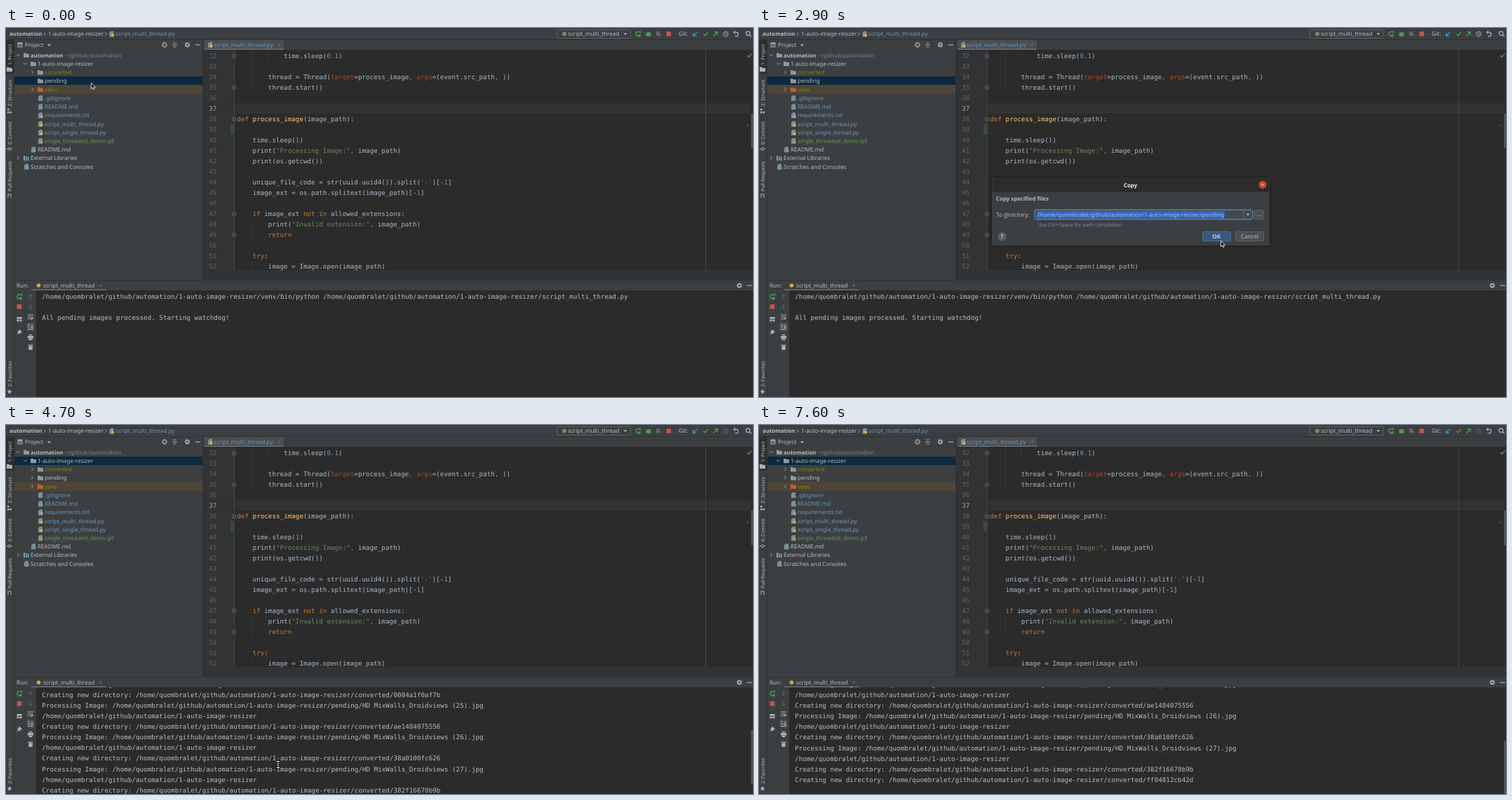
Animation, 1065 px wide and 526 px high, one loop 8.2 s. Source, as an HTML page with a canvas:

```html
<!DOCTYPE html>
<html lang="en">
<head>
<meta charset="utf-8">
<title>Image resizer demo</title>
<style>
  html, body { margin: 0; width: 100%; height: 100%; overflow: hidden; background: #2b2b2b; }
  canvas { display: block; width: 1065px; height: 526px; }
</style>
</head>
<body>
<canvas id="stage" width="1065" height="526"></canvas>
<script>
const ctx = document.getElementById('stage').getContext('2d');
const LOOP = 8200, STEP = 100;
const UI = '"Noto Sans", "Open Sans", sans-serif';
const MONO = '"DejaVu Sans Mono", "Noto Sans Mono", monospace';
const MONO_SIZE = 9.25, CHAR = MONO_SIZE * 0.602, LINE = 15.03, ROW = 12.22;
const C = {
  panel: '#3c3f41', editor: '#2b2b2b', gutter: '#313335', edge: '#323232', text: '#bbbbbb',
  icon: '#afb1b3', dim: '#64676a', blue: '#6897bb', olive: '#848504', green: '#629755',
  go: '#499c54', red: '#c75450', select: '#0d293e', folder: '#8e9aa2', py: '#c9b04a',
  underline: '#66707a'
};
const ROOT = '/home/quombralet/github/automation/1-auto-image-resizer';

function rect(x, y, w, h, color) { ctx.fillStyle = color; ctx.fillRect(x, y, w, h); }

function box(x, y, w, h, fill, stroke, r = 2) {
  ctx.beginPath();
  ctx.roundRect(x + .5, y + .5, w - 1, h - 1, r);
  if (fill) { ctx.fillStyle = fill; ctx.fill(); }
  if (stroke) { ctx.strokeStyle = stroke; ctx.lineWidth = 1; ctx.stroke(); }
}

function dot(x, y, r, color) {
  ctx.fillStyle = color;
  ctx.beginPath(); ctx.arc(x, y, r, 0, 7); ctx.fill();
}

function ring(x, y, r, color, from = 0, to = Math.PI * 2, w = 1) {
  ctx.strokeStyle = color; ctx.lineWidth = w;
  ctx.beginPath(); ctx.arc(x, y, r, from, to); ctx.stroke();
}

// Points are "x,y x,y ..." relative to a centre; "M" starts a new stroke.
function trace(x, y, points) {
  ctx.beginPath();
  for (const part of points.split('M')) {
    part.trim().split(' ').forEach((p, i) => {
      const [dx, dy] = p.split(',').map(Number);
      i ? ctx.lineTo(x + dx, y + dy) : ctx.moveTo(x + dx, y + dy);
    });
  }
}
function lines(x, y, points, color = C.icon, w = 1) {
  trace(x, y, points); ctx.strokeStyle = color; ctx.lineWidth = w; ctx.stroke();
}
function poly(x, y, points, color = C.icon) {
  trace(x, y, points); ctx.fillStyle = color; ctx.fill();
}

function label(s, x, y, color = C.text, { size = 8.15, bold = false, align = 'left' } = {}) {
  ctx.font = `${bold ? 'bold ' : ''}${size}px ${UI}`;
  ctx.fillStyle = color; ctx.textAlign = align;
  ctx.fillText(s, x, y + 2.9);
}
function mono(s, x, y, color = C.text, align = 'left') {
  ctx.font = `${MONO_SIZE}px ${MONO}`;
  ctx.fillStyle = color; ctx.textAlign = align;
  ctx.fillText(s, x, y + 3.3);
}

const down = (x, y, color) => poly(x, y, '-2.5,-1.3 2.5,-1.3 0,1.7', color);
const close = (x, y, color = '#777a7c') => lines(x, y, '-1.7,-1.7 1.7,1.7 M 1.7,-1.7 -1.7,1.7', color, .8);
const check = (x, y, color) => lines(x, y, '-3,0 -1,2.4 3.2,-2.6', color, 1.4);
const minus = (x, y) => rect(x - 3.5, y - .5, 7, 1.2, C.icon);
const folder = (x, y, color = C.folder) => poly(x, y, '-4,-3.2 -.8,-3.2 .4,-2 4,-2 4,3.2 -4,3.2', color);
function chevron(x, y, open) {
  lines(x, y, open ? '-2.3,-1.2 0,1.3 2.3,-1.2' : '-1.2,-2.3 1.3,0 -1.2,2.3', '#a0a3a5');
}
function file(x, y, badge) {
  poly(x, y, '-1,-4 3,-4 3,4 -3,4 -3,-2', '#828d94');
  if (badge) dot(x + 1.6, y + 1.7, 2.2, badge);
}
function gear(x, y) {
  ring(x, y, 2.2, C.icon, 0, 7, 1.6);
  for (let i = 0; i < 8; i++) {
    const a = i * Math.PI / 4;
    dot(x + 3.2 * Math.cos(a), y + 3.2 * Math.sin(a), .7, C.icon);
  }
}
function rerun(x, y) {
  ring(x, y, 3, C.go, .2, 5, 1.3);
  poly(x, y, '.5,-4 4,-4 4,-.6', C.go);
  rect(x, y + 1, 3.5, 3, C.go);
}
function sideLabel(s, y, color = C.text) {
  ctx.save();
  ctx.translate(5, y); ctx.rotate(-Math.PI / 2);
  label(s, 0, 0, color, { size: 6.9 });
  ctx.restore();
}

function drawTopBar(busy) {
  label('automation', 5, 8.5, C.text, { bold: true, size: 7.85 });
  chevron(55, 8.5);
  label('1-auto-image-resizer', 60, 8.5);
  chevron(142.5, 8.5);
  file(150.5, 8.5, C.py);
  label('script_multi_thread.py', 156, 8.5, C.blue);
  box(785, 2, 106, 13, null, '#5e6163');
  dot(796, 8.5, 3, '#6f8f6a');
  label('script_multi_thread', 801, 8.5);
  down(883, 8.5, C.icon);
  rerun(901, 8.5);
  dot(916, 9, 3.2, C.go);
  lines(916, 9, '-4,-2 4,2 M -4,2 4,-2 M -4,0 4,0', C.go, .8);
  rect(927, 5, 5, 6, C.dim);
  poly(932, 9.5, '-1.5,-3 3,0 -1.5,3', '#5a5d5f');
  rect(941.5, 5.2, 6.5, 6.5, C.red);
  label('Git:', 959, 8.5);
  lines(982.5, 8.5, '3,-3 -2.5,2.5 M -2.8,-1.5 -2.8,2.8 1.5,2.8', '#3592c4', 1.4);
  check(997.5, 8.5, C.go);
  lines(1011.5, 8.5, '-3,3 2.5,-2.5 M -1.5,-2.8 2.8,-2.8 2.8,1.5', C.go, 1.4);
  const clock = busy ? C.dim : C.icon;
  ring(1026, 8.5, 3.4, clock);
  lines(1026, 8.5, '0,-2 0,.3 1.8,.3', clock);
  ring(1041, 9, 2.8, C.icon, -1.6, 2.2, 1.2);
  lines(1041, 9, '0,-2.8 -3.3,-2.8 M -1.2,-5 -3.4,-2.8 -1.2,-.6', C.icon, 1.1);
  ring(1058, 7.7, 2.8, C.icon, 0, 7, 1.2);
  lines(1058, 7.7, '2,2 4.6,4.6', C.icon, 1.3);
}

function drawSideBar() {
  rect(0, 17, 11, 48, '#2d2f30');
  sideLabel('1: Project', 53);
  folder(5, 59, C.icon);
  sideLabel('Z: Structure', 111.5);
  for (const [x, y] of [[2, 115], [2, 119], [5.5, 119]]) rect(x, y, 2.5, 2.5, C.icon);
  sideLabel('0: Commit', 166.5);
  ring(5, 172.5, 1.8, C.icon);
  lines(5, 172.5, '-4,0 -2,0 M 2,0 4,0');
  sideLabel('Pull Requests', 233);
  lines(5, 239, '-2,-3 -2,3 M 2,3 2,-2 -1,-2');
  sideLabel('2: Favorites', 511.5);
  poly(5, 518, '0,-3.6 1,-1 3.6,-1 1.6,.8 2.3,3.4 0,1.9 -2.3,3.4 -1.6,.8 -3.6,-1 -1,-1');
}

// [indent, text, colour, icon, chevron]
const TREE = [
  [0, 'automation', C.text, 'dir', 'open'],
  [1, '1-auto-image-resizer', C.text, 'dir', 'open'],
  [2, 'converted', C.olive, 'dir', 'shut'],
  [2, 'pending', C.text, 'dir'],
  [2, 'venv', C.olive, 'venv', 'shut'],
  [2, '.gitignore', C.blue, '#7d8a94'],
  [2, 'README.md', C.blue, '#5b9cc0'],
  [2, 'requirements.txt', C.blue, '#9aa7b0'],
  [2, 'script_multi_thread.py', C.blue, C.py],
  [2, 'script_single_thread.py', C.blue, C.py],
  [2, 'single_threaded_demo.gif', C.green, '#7fa86a'],
  [1, 'README.md', C.text, '#5b9cc0'],
  [0, 'External Libraries', C.text, 'lib', 'shut'],
  [0, 'Scratches and Consoles', C.text, '#5b9cc0']
];

function drawProject(copied) {
  rect(16.5, 20.5, 7, 7, '#9aa7b0');
  rect(17.5, 23, 5, 3.5, '#45687f');
  label('Project', 27, 24);
  down(61.5, 24.5, C.icon);
  ring(226, 24, 3.3, C.icon);
  lines(226, 24, '-3.5,0 -1,0 M 1,0 3.5,0 M 0,-3.5 0,-1 M 0,1 0,3.5');
  lines(240.5, 24, '-3.5,0 3.5,0 M -2,-4 0,-2 2,-4 M -2,4 0,2 2,4');
  gear(258.5, 24);
  minus(273.5, 24);

  const top = 38.9;
  const band = (row, color) => {
    const y = Math.round(top - .2 + (row - .5) * ROW);
    rect(11, y, 269, Math.round(top - .2 + (row + .5) * ROW) - y, color);
  };
  band(4, '#4d4538');
  band(copied ? 1 : 3, C.select);
  TREE.forEach(([depth, name, color, icon, arrow], i) => {
    const x = 29 + depth * 10, y = top + i * ROW;
    const mark = name === 'pending' && copied ? 'shut' : arrow;
    if (mark) chevron(x - 11.5, y - .3, mark === 'open');
    if (icon === 'dir') folder(x, y);
    else if (icon === 'venv') folder(x, y, '#c2602d');
    else if (icon === 'lib') [0, 1, 2].forEach(k => rect(x - 4 + k * 2.8, y - 3.5 + k * .7, 2, 7 - k * .7, k ? '#5b9cc0' : '#8e9aa2'));
    else file(x, y, icon);
    label(name, x + 6, y, color, i ? {} : { bold: true, size: 7.85 });
  });
  label('~/github/automation', 84, top, '#808385');
}

const CODE = `            time.sleep(0.1)

        thread = Thread(target=process_image, args=(event.src_path, ))
        thread.start()


def process_image(image_path):

    time.sleep(1)
    print("Processing Image:", image_path)
    print(os.getcwd())

    unique_file_code = str(uuid.uuid4()).split('-')[-1]
    image_ext = os.path.splitext(image_path)[-1]

    if image_ext not in allowed_extensions:
        print("Invalid extension:", image_path)
        return

    try:
        image = Image.open(image_path)`.split('\n');

const TOKENS = [
  [/^(".*?"|'.*?')/, '#6a8759'],
  [/^(def|if|not|in|return|try)\b/, '#cc7832'],
  [/^(target|args)(?==)/, '#aa4926'],
  [/^process_image(?=\(image_path\):)/, '#ffc66d'],
  [/^,/, '#cc7832'],
  [/^\d+(\.\d+)?/, '#6897bb'],
  [/^(\w+|\s+|[^\w\s])/, '#a9b7c6']
];
function codeLine(s, x, y) {
  while (s) {
    const [rule, color] = TOKENS.find(([r]) => r.test(s));
    const word = s.match(rule)[0];
    if (word.trim()) mono(word, x, y, color);
    x += word.length * CHAR;
    s = s.slice(word.length);
  }
}

function drawEditor(busy) {
  rect(283, 17, 113, 14, '#4a4e50');
  rect(283, 29.5, 113, 1.5, C.underline);
  file(291, 24, C.py);
  label('script_multi_thread.py', 296, 24, C.blue);
  close(389.5, 24);

  rect(281, 31, 784, 314, C.editor);
  rect(281, 31, 45, 314, C.gutter);
  const y0 = 39.5, current = 5;
  rect(281, Math.round(y0 + (current - .5) * LINE), 781, 15, '#323232');
  rect(325, 31, 1, 314, '#424445');
  for (const [x, y, h] of [[351, 31, 61], [373, 31, 16], [351, 273, 30], [351, 333, 12]])
    rect(x, y, 1, h, '#353637');
  rect(997, 31, 1, 314, '#464646');
  rect(320, 137, 6, 15, '#384c38');
  CODE.forEach((s, i) => {
    const y = y0 + i * LINE;
    mono(String(32 + i), 300.3, y, i === current ? '#a4a3a3' : '#606366', 'right');
    codeLine(s, 329.3, y);
  });
  for (const i of [0, 3, 6, 15, 17]) {
    const y = Math.round(y0 + i * LINE);
    box(322, y - 3, 6, 6, C.gutter, '#606366', 1);
    rect(323.7, y - .4, 2.6, .8, '#808284');
  }
  check(1060, 39, busy ? '#34613c' : C.go);
  rect(1062, 122, 3, 49, '#4f5152');
  rect(1057, 137.5, 1.2, 2.5, '#4f7a50');
  rect(281, 345, 784, 14, C.gutter);
}

const PHOTO = n => `Processing Image: ${ROOT}/pending/HD MixWalls_Droidviews (${n}).jpg`;
const MADE = id => `Creating new directory: ${ROOT}/converted/${id}`;
const HEADER = [`${ROOT}/venv/bin/python ${ROOT}/script_multi_thread.py`, '', 'All pending images processed. Starting watchdog!'];
const LOG = [
  ...HEADER, PHOTO(23), ROOT, PHOTO(24), ROOT,
  MADE('0084a1f0af7b'), PHOTO(25), ROOT,
  MADE('ae1484075556'), PHOTO(26), ROOT,
  MADE('38a0100fc626'), PHOTO(27), ROOT,
  MADE('382f16670b9b'), MADE('ff04812cb42d')
];

function drawRun(t) {
  rect(11, 359, 1054, 1, C.edge);
  label('Run:', 15, 367);
  dot(46.5, 367, 2.8, C.py);
  label('script_multi_thread', 53, 367);
  close(135, 367);
  rect(36, 372.5, 107, 1.5, C.underline);
  gear(1045.5, 367);
  minus(1060, 367);

  rerun(19, 383);
  rect(15.7, 394, 6.5, 6.5, C.red);
  rect(15.5, 412, 7, 2.7, C.icon); rect(15.5, 415.6, 3, 2.7, C.icon); rect(19.5, 415.6, 3, 2.7, C.icon);
  poly(19, 433.5, '0,-4 4,0 2.5,.6 0,3 -1,1.7 -3.7,4 -4,3.7 -1.7,1 -3,0 -.6,-2.5');
  lines(35, 383, '0,3.5 0,-3 M -2.5,-.5 0,-3 2.5,-.5', C.dim);
  lines(35, 397, '0,-3.5 0,3 M -2.5,.5 0,3 2.5,.5', C.dim);
  lines(35, 412, '-4,-3 4,-3 M -4,0 3,0 3.5,2.5 0,2.5 M 1.5,1 0,2.5 1.5,4 M -4,2.8 -1.5,2.8');
  box(29, 420, 12, 12, '#4f5355', null);
  lines(35, 426, '-4,3.3 4,3.3 M -4,0 -1,0 M -4,-3 -1,-3 M 2,-3.5 2,1.5 M 0,-.3 2,1.6 4,-.3');
  rect(31, 439, 8, 3.5, C.icon); rect(32.7, 436.8, 4.6, 1.5, C.icon); rect(32.7, 443, 4.6, 2, C.icon);
  rect(31.5, 451.5, 7, 1.2, C.icon); rect(32.3, 453.3, 5.4, 5.5, C.icon);
  rect(27, 374, 1, 152, '#36393b');

  rect(43, 374, 1022, 152, C.editor);
  ctx.save();
  ctx.beginPath(); ctx.rect(43, 374, 1022, 152); ctx.clip();
  const scroll = t < 4500 ? 0 : t < 4700 ? 43 : t < 5000 ? 102.7 : 132.7;
  (t < 4500 ? HEADER : LOG).forEach((s, i) => mono(s, 51.3, 382.5 + i * LINE - scroll));
  ctx.restore();
  if (scroll) rect(1062, t < 4700 ? 405 : t < 5000 ? 435 : 450, 3, 77, '#4f5152');
}

const MENU = ['New>', '', 'Cut|Ctrl+X', 'Copy|Ctrl+C', 'Paste|Ctrl+V', '',
  'Find Usages|Alt+F7', 'Find in Files...|Ctrl+Shift+F', 'Replace in Files...|Ctrl+Shift+R', 'Inspect Code...', '',
  'Refactor>', '', 'Add to Favorites>', '', 'Show Image Thumbnails', '',
  'Reformat Code|Ctrl+Alt+L', 'Optimize Imports|Ctrl+Alt+O', 'Delete...|Delete', '',
  'Show in Files', 'Directory Path', 'Open in Terminal', '',
  'Local History>', 'Git>', 'Reload from Disk', '', 'Compare With...|Ctrl+D', '',
  'Mark Directory as>', '', 'Remove BOM', '', 'Create Gist...'];

function drawMenu(pointerY) {
  box(119, 78, 159, 339, C.panel, '#515151', 0);
  let y = 79.5;
  for (const item of MENU) {
    if (!item) { rect(120, y + 2, 157, 1, '#515151'); y += 4.5; continue; }
    const hot = pointerY >= y && pointerY < y + 12;
    if (hot) rect(120, y, 157, 12, '#4b6eaf');
    const [name, keys] = item.replace('>', '').split('|');
    label(name, 135, y + 6);
    if (keys) label(keys, 269, y + 6, hot ? C.text : '#8c8f91', { size: 7.4, align: 'right' });
    if (item.endsWith('>')) poly(271, y + 6, '-1.5,-2.5 1.5,0 -1.5,2.5');
    y += 12;
  }
}

function drawDialog() {
  ctx.save();
  ctx.shadowColor = 'rgba(0,0,0,.45)'; ctx.shadowBlur = 5;
  rect(332, 213, 396, 97, C.panel);
  ctx.restore();
  box(332, 212, 396, 24, '#2c2c2c', null, 4);
  rect(332, 234, 396, 76, C.panel);
  label('Copy', 529.5, 224, '#f0f0f0', { bold: true, size: 7.9, align: 'center' });
  dot(718, 223.3, 5.6, '#c7472b');
  close(718, 223.3, '#ffffff');
  label('Copy specified files', 338, 243, C.text, { bold: true, size: 7.9 });
  label('To directory:', 338, 266);
  rect(349.5, 270.3, 4.5, .8, C.text);
  box(393, 259, 311, 14, '#45494a', '#4a7fb5');
  box(392, 258, 313, 16, null, '#3d6185', 3);
  rect(396, 261, 268, 10.5, '#2f65ca');
  label(`${ROOT}/pending`, 397, 266);
  rect(690, 260, 1, 12, '#5e6163');
  down(697, 266, C.icon);
  box(706, 259, 14, 14, '#4c5052', '#5e6163');
  label('...', 713, 265, C.text, { align: 'center' });
  label('Use Ctrl+Space for path completion', 397.5, 280, '#8a8c8d', { size: 7.2 });
  dot(346.5, 297.3, 6.3, '#585c5e');
  label('?', 346.5, 297.3, '#d0d0d0', { bold: true, align: 'center' });
  box(632, 290, 41, 14, '#365880', '#4c708c');
  label('OK', 652.3, 297, '#c8cdd2', { bold: true, align: 'center' });
  box(679, 290, 41, 14, '#4c5052', '#5e6163');
  label('Cancel', 699.5, 297, C.text, { align: 'center' });
}

// Pointer path: [time, x, y]
const PATH = [
  [0, 121, 78], [200, 119, 77], [1200, 119, 77], [1600, 171, 122], [2000, 171, 122],
  [2100, 454, 203], [2200, 454, 203], [2500, 640, 318], [2600, 692, 329], [2700, 668, 312],
  [2800, 668, 312], [2900, 658, 303], [3000, 658, 303], [3700, 422, 481], [3900, 356, 484],
  [4200, 388, 484], [5100, 388, 484], [5500, 579, 461], [5600, 579, 461], [5800, 447, 457],
  [6000, 506, 450], [6300, 635, 355], [6400, 635, 355], [6500, 834, 144],
  [7100, 950, 18], [7500, 498, 6]
];
function pointerAt(t) {
  const i = PATH.findIndex(p => p[0] >= t);
  if (i < 1) return PATH[i < 0 ? PATH.length - 1 : 0].slice(1);
  const [t0, x0, y0] = PATH[i - 1], [t1, x1, y1] = PATH[i];
  const k = (t - t0) / (t1 - t0);
  return [x0 + (x1 - x0) * k, y0 + (y1 - y0) * k];
}
function drawPointer(t, x, y) {
  if ((t >= 6600 && t < 7100) || t >= 7600) return;
  if (t >= 3000 && t < 7000) {
    const beam = '-2.2,-4.5 2.2,-4.5 M 0,-4.5 0,4.5 M -2.2,4.5 2.2,4.5';
    lines(x, y, beam, '#111111', 2.4);
    lines(x, y, beam, '#e8e8e8', 1);
  } else {
    const arrow = '.5,.3 .5,8.6 2.4,6.9 3.7,9.7 5.1,9 3.9,6.4 6.6,6.2 .5,.3';
    poly(x, y, arrow, '#111111');
    lines(x, y, arrow, '#e8e8e8', .9);
  }
}

function draw(t) {
  const copied = t >= 3200, [px, py] = pointerAt(t);
  ctx.textRendering = 'geometricPrecision';
  rect(0, 0, 1065, 526, C.panel);
  drawTopBar(copied);
  drawSideBar();
  drawProject(copied);
  drawEditor(copied && t < 4700);
  drawRun(t);
  rect(0, 16, 1065, 1, C.edge);
  rect(11, 17, 1, 509, C.edge);
  rect(280, 17, 1, 342, C.edge);
  if (t >= 1000 && t < 1900) drawMenu(py);
  if (t >= 2100 && t < 3000) drawDialog();
  drawPointer(t, px, py);
}

let shown = -1;
const start = performance.now();
function tick() {
  const t = Math.floor((performance.now() - start) % LOOP / STEP) * STEP;
  if (t !== shown) draw(shown = t);
  requestAnimationFrame(tick);
}
tick();
</script>
</body>
</html>
```
